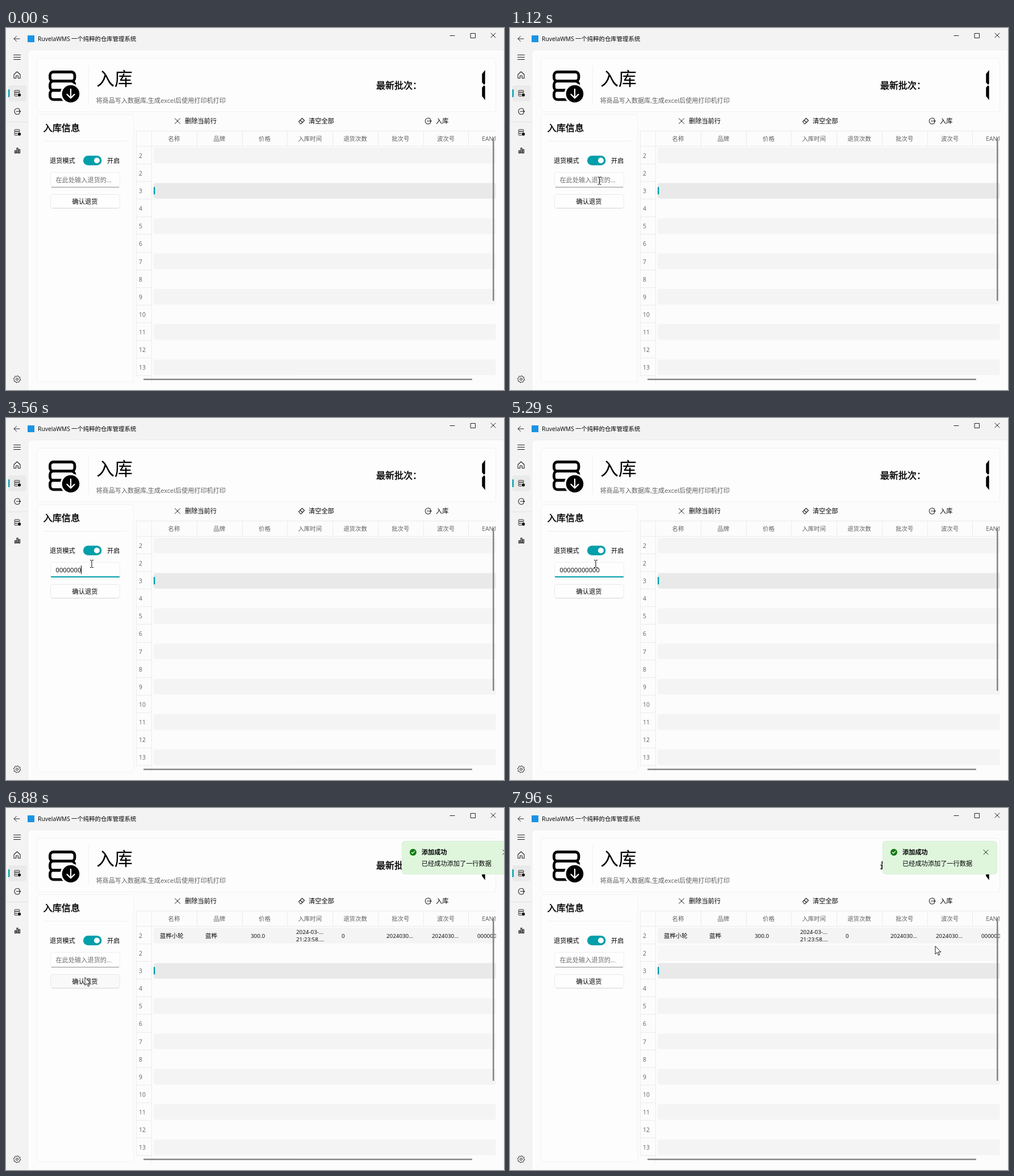
Recreate the animation shown at these times as an HTML page. Size 877 by 638 pixels, loop 8000 ms.

```html
<!DOCTYPE html>
<html lang="zh-CN">
<head>
<meta charset="utf-8">
<style>
  html, body { margin: 0; width: 100%; height: 100%; overflow: hidden; background: #f3f3f3; }
  svg { display: block; font-family: "Open Sans", "Noto Sans CJK SC", "Noto Sans CJK", sans-serif; }
  .line { fill: none; stroke: #222; stroke-linecap: round; stroke-linejoin: round; }
  .semibold { stroke: #000; stroke-width: .45; }
</style>
</head>
<body>
<svg id="stage" width="877" height="638" viewBox="0 0 877 638"></svg>
<script>
const LOOP = 8000, TEAL = '#009faa', GREY = '#606060', EDGE = '#ebebeb';
const ROW = 31.1, COL = 79.75, ROW_TOP = 209.5;
const BODY = 11.2, SMALL = 10.4, CELL = 9.8;

// Text is placed by its vertical centre.
const text = (x, y, str, size = BODY, fill = '#000', extra = '') =>
  `<text x="${x}" y="${y + size * 0.38}" font-size="${size}" fill="${fill}" ${extra}>${str}</text>`;
const rect = (x, y, w, h, fill, r = 0, extra = '') =>
  `<rect x="${x}" y="${y}" width="${w}" height="${h}" rx="${r}" fill="${fill}" ${extra}/>`;
const path = (d, width = 1, extra = '') => `<path class="line" d="${d}" stroke-width="${width}" ${extra}/>`;
const rule = (d, color = EDGE) => `<path d="${d}" stroke="${color}" fill="none"/>`;
const at = (x, y, content) => `<g transform="translate(${x} ${y})">${content}</g>`;
const card = (x, y, w, h) => rect(x + .5, y + .5, w - 1, h - 1, '#fdfdfd', 5, 'stroke="#f2f2f2"');
const range = (n, make) => Array.from({ length: n }, (_, i) => make(i)).join('');
const cross = r => path(`M${-r} ${-r}L${r} ${r}M${r} ${-r}L${-r} ${r}`);
const middle = 'text-anchor="middle"', semibold = 'class="semibold"';

function gear(outer, inner) {
  const points = Array.from({ length: 32 }, (_, i) => {
    const r = i % 4 < 2 ? outer : inner, a = (i + .5) * Math.PI / 16;
    return `${(r * Math.cos(a)).toFixed(2)} ${(r * Math.sin(a)).toFixed(2)}`;
  });
  return path(`M${points.join('L')}Z`) + '<circle class="line" r="2"/>';
}

const exitIcon = path('M4 -3.3A5.2 5.2 0 1 0 4 3.3M-2 0H5.5M3.5 -2L5.5 0L3.5 2', 1.1);
const stackIcon = range(3, i => rect(-5, -5 + i * 3.3, 9, 3.3, 'none', 1.2, 'stroke="#222"'))
  + '<circle cx="3.5" cy="3" r="3.4" fill="#f3f3f3"/><circle cx="3.5" cy="3" r="2.7" fill="#111"/>';

function windowFrame() {
  return rect(0, 0, 877, 638, '#f3f3f3')
    + '<path d="M877 38.5H46Q38.5 38.5 38.5 46V640H877Z" fill="#fcfcfc" stroke="#ececec"/>'
    + path('M24 19H14M18.5 14.5L14 19L18.5 23.5')
    + rect(38, 13, 12, 12, '#1b93e4')
    + text(56, 19, 'RuvelaWMS', SMALL) + text(115, 19, '一个纯粹的仓库管理系统', SMALL)
    + path('M782 13.5H790M818.5 9.5H826.5V17.5H818.5Z') + at(858, 13, cross(4));
}

function sidebar() {
  return path('M13.5 47.5H25.5M13.5 51.5H25.5M13.5 55.5H25.5')
    + at(19.5, 83, path('M-5.5 -1L0 -6L5.5 -1V5.5H1.8V1H-1.8V5.5H-5.5Z', 1.1))
    + rect(4, 101, 32, 28, '#eaeaea', 4) + rect(4, 108, 2.4, 14, TEAL, 1.2)
    + at(20, 115, stackIcon) + at(20, 147, exitIcon)
    + rule('M0 165.5H38', '#e3e3e3')
    + at(20, 184, stackIcon)
    + at(20, 216, path('M-4.5 4.5V0H-2.5V4.5ZM-1 4.5V-4.5H1V4.5ZM2.5 4.5V-2H4.5V4.5Z', 1.2))
    + at(19.5, 619, gear(6.2, 4.9));
}

function header() {
  const stack = range(3, i => rect(77.5, 77.5 + i * 16.2, 43.5, 16.2, 'none', 6, 'stroke="#000" stroke-width="4.8"'));
  return card(54, 53, 809, 95) + stack
    + '<circle cx="114" cy="116" r="18.5" fill="#fdfdfd"/><circle cx="114" cy="116" r="15.3"/>'
    + path('M114 108V123M107.5 117L114 123.5L120.5 117', 2.3, 'style="stroke:#fff"')
    + rule('M145.5 66V135', '#f0f0f0')
    + text(159, 88.5, '入库', 32)
    + text(158.5, 128, '将商品写入数据库,生成excel后使用打印机打印', 11.1, GREY)
    + text(652, 101, '最新批次：', 16, '#000', semibold)
    + '<path d="M843.7 74V98L842 100L838.3 96V81ZM843.7 127V103L842 101L838.3 105V120Z"/>';
}

function form() {
  return card(54, 152, 171, 472)
    + text(65.5, 176, '入库信息', 16.2, '#000', semibold)
    + rule('M66 199.5H213', '#eee')
    + text(77, 234, '退货模式') + text(178, 234, '开启')
    + rect(136, 225, 32.5, 17, TEAL, 8.5) + '<circle cx="160" cy="233.5" r="5" fill="#fff"/>'
    + rect(78.5, 254.5, 122, 26, '#fefefe', 4, 'stroke="#eee"')
    + '<path id="underline" fill="none"/>'
    + text(87.5, 268, '', BODY, '#000', 'id="entry"') + rect(88, 260, 1, 15, '#000', 0, 'id="caret"')
    + rect(78.5, 293.5, 122, 24, '#fefefe', 4, 'stroke="#eaeaea" id="button"')
    + rule('M81 317.5H198', '#d2d2d2')
    + text(139, 305.5, '确认退货', BODY, '#000', middle + ' id="buttonText"');
}

function toolbar() {
  return at(302, 164, cross(4.5)) + text(315, 164, '删除当前行')
    + at(520.5, 164, path('M-5 1L1 -5L5 -1L-1 5H-2Z M-2.5 -1.5L1.5 2.5', 1.1)) + text(533, 164, '清空全部')
    + at(743.5, 164, exitIcon) + text(757, 164, '入库');
}

function table() {
  const titles = ['名称', '品牌', '价格', '入库时间', '退货次数', '批次号', '波次号', 'EAN13'];
  const rowMid = i => 225 + i * ROW;
  const cells = text(271, 225, '蓝桦小轮', SMALL) + text(351, 225, '蓝桦', SMALL)
    + [[431, 225, '300.0'], [511, 218, '2024-03-...'], [511, 231.5, '21:23:58....'], [591, 225, '0'],
       [670, 225, '2024030...'], [750, 225, '2024030...'], [830, 225, '0000000000017']]
      .map(([x, y, s]) => text(x, y, s, CELL)).join('');
  return '<clipPath id="view"><path d="M229 181H862.5V624H229Z"/></clipPath><g clip-path="url(#view)">'
    + range(7, i => rect(260, rowMid(2 * i) - 14, 620, 27.5, i === 1 ? '#e9e9e9' : '#f4f4f4', 4))
    + rect(260, 0, 620, 27.5, '#f7f7f7', 4, 'id="hover"')
    + rect(260, 280, 2.4, 13.5, TEAL, 1.2)
    + rule('M229 181.5H863M229 208.5H863M229.5 181V612M256.5 181V624')
    + titles.map((s, i) => rule(`M${Math.round(256 + i * COL) + .5} 181V208`)
        + text(296 + i * COL, 195.5, s, SMALL, GREY, middle)).join('')
    + range(13, i => text(234, rowMid(i), i ? i + 1 : 2, SMALL, GREY)
        + rule(`M229 ${Math.round(239 + i * ROW) + .5}H256`))
    + `<g id="record">${cells}</g></g>`
    + rect(857, 193, 2.6, 288, '#868686', 1.3) + rect(242, 618, 579, 2.4, '#868686', 1.2);
}

function toast() {
  return '<g id="toast">' + rect(.5, 58.5, 201, 58, '#dff6dd', 5, 'stroke="#d9eed7"')
    + '<circle cx="20" cy="78" r="6" fill="#0f7b0f"/>'
    + path('M17.3 78.2L19.2 80L22.8 76.2', 1.2, 'style="stroke:#fff"')
    + text(35, 78, '添加成功', BODY, '#000', 'font-weight="700"')
    + text(35, 97.5, '已经成功添加了一行数据') + at(182, 78, cross(4)) + '</g>';
}

const pointers = '<path id="arrow" d="M0 0V14L3.2 11L5.6 16L7.7 15.1L5.4 10.3H9.9Z" fill="#fff" stroke="#000" stroke-width=".9"/>'
  + '<path id="beam" d="M-3 -6.5H-1L0 -5.5L1 -6.5H3M0 -5.5V5.5M-3 6.5H-1L0 5.5L1 6.5H3" fill="none" stroke="#000"/>';

document.getElementById('stage').innerHTML =
  windowFrame() + sidebar() + header() + form() + toolbar() + table() + toast() + pointers;

const $ = id => document.getElementById(id);
const set = (id, attrs) => { for (const k in attrs) $(id).setAttribute(k, attrs[k]); };
const show = (id, on) => set(id, { visibility: on ? 'visible' : 'hidden' });

const CODE = '0000000000017';
const KEY_TIMES = [2330, 2470, 2710, 2900, 3130, 3320, 3560, 3790, 4070, 4360, 4640, 5340, 5570];
const CARET_ON = [[1690, 2160], [2330, 5290], [5340, 6060], [6590, 6780]];
const FOCUS = 1690, SUBMIT = 6780, TOAST = 6766;
// time, x, y
const MOVES = [
  [0, 462, 645], [110, 462, 645], [230, 425, 572], [400, 312, 425], [560, 215, 326], [680, 172, 290],
  [790, 160.5, 280.5], [890, 160.5, 276], [940, 160.5, 276], [1440, 152, 257], [1640, 152, 257],
  [1770, 151, 257], [6030, 151, 257], [6310, 140, 273], [6540, 139, 298.5], [7400, 139, 298.5],
  [7500, 165, 293], [7580, 260, 280], [7680, 440, 261], [7730, 543, 252], [7780, 623, 247],
  [7830, 675, 245], [7890, 723, 243.5], [7960, 749, 243.5], [LOOP, 749, 243.5]
];

function pointerAt(ms) {
  const i = MOVES.findIndex(m => m[0] > ms);
  const [t0, x0, y0] = MOVES[i - 1], [t1, x1, y1] = MOVES[i];
  const p = (ms - t0) / (t1 - t0);
  return [x0 + (x1 - x0) * p, y0 + (y1 - y0) * p];
}

function render(ms) {
  const [x, y] = pointerAt(ms);
  const inForm = x > 78 && x < 201;
  const overInput = inForm && y > 254 && y < 281;
  const overButton = inForm && y > 293 && y < 318;
  for (const id of ['arrow', 'beam']) set(id, { transform: `translate(${x} ${y})` });
  show('arrow', !overInput);
  show('beam', overInput);

  const row = Math.floor((y - ROW_TOP) / ROW);
  show('hover', x > 258 && row % 2 === 1 && row < 13);
  set('hover', { y: 211 + row * ROW });

  const focused = ms >= FOCUS && ms < SUBMIT;
  const typed = focused ? CODE.slice(0, KEY_TIMES.filter(t => ms >= t).length) : '';
  $('entry').textContent = typed || '在此处输入退货的...';
  set('entry', { fill: typed ? '#000' : '#6e6e6e' });
  set('underline', focused
    ? { d: 'M79 280H200', stroke: TEAL, 'stroke-width': 2 }
    : { d: 'M80 280.5H199', stroke: '#8a8a8a', 'stroke-width': 1 });
  show('caret', CARET_ON.some(([a, b]) => ms >= a && ms < b));
  set('caret', { x: Math.round(87.6 + (typed ? $('entry').getComputedTextLength() : 0)) });

  set('button', { fill: overButton ? '#f9f9f9' : '#fefefe' });
  set('buttonText', { fill: ms > 6690 && ms < SUBMIT ? GREY : '#000' });

  show('record', ms >= SUBMIT);
  show('toast', ms >= TOAST);
  const left = 1 - Math.min(1, Math.max(0, (ms - TOAST) / 200));
  set('toast', { transform: `translate(${656 + 221 * left * left} 0)` });
}

let start;
function tick(now) {
  start ??= now;
  render((now - start) % LOOP);
  requestAnimationFrame(tick);
}
render(0);
requestAnimationFrame(tick);
</script>
</body>
</html>
```
